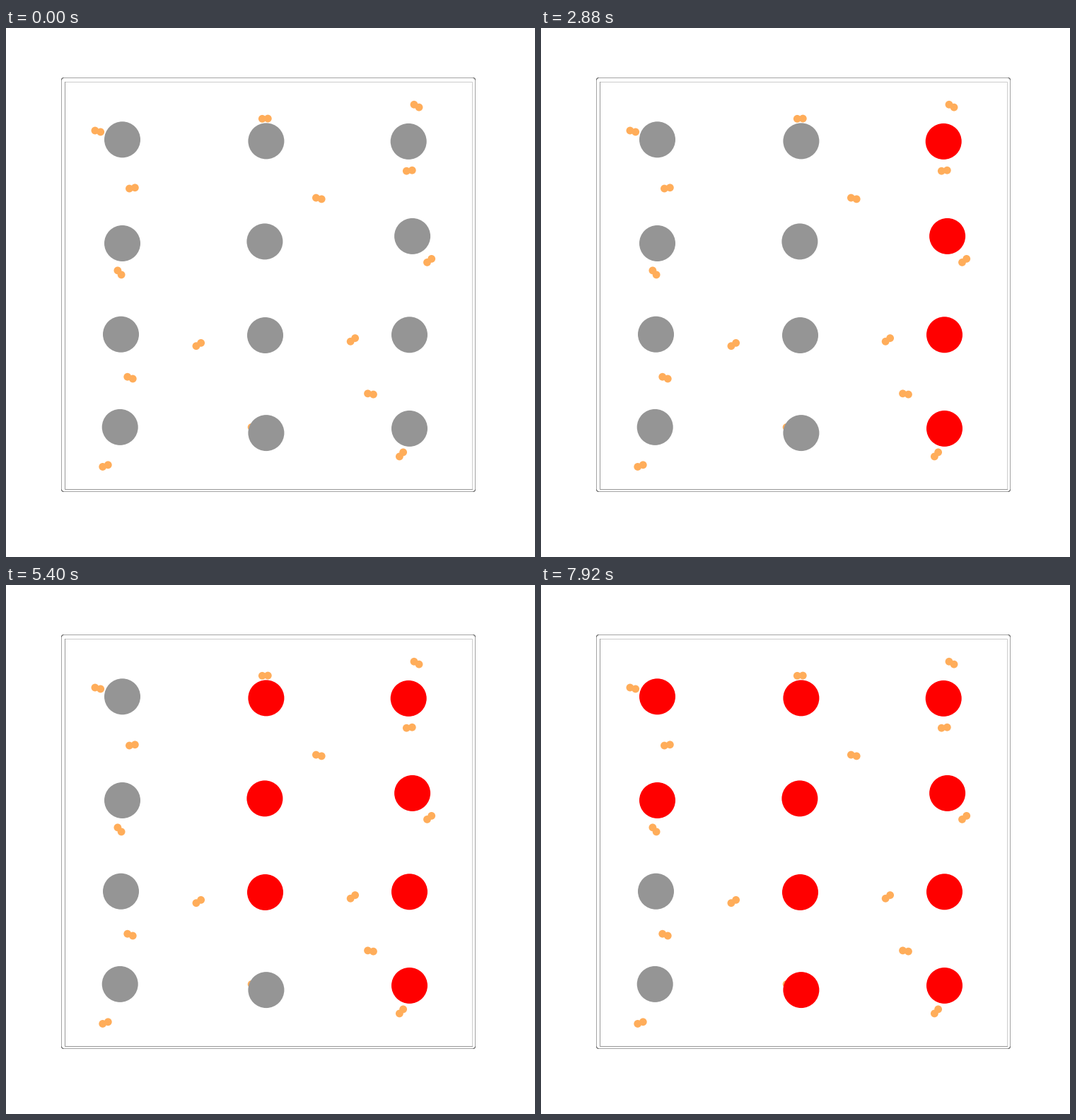
Write a matplotlib script that moves like this. It is 748x748 px and loops after 8 s.

```python
from math import cos, radians, sin

import matplotlib.pyplot as plt
from matplotlib.animation import FuncAnimation
from matplotlib.patches import Arc, Circle, FancyBboxPatch

SIZE, DPI = 748, 64
PX = 72 / DPI                      # one pixel in points
STEP, LOOP = 40, 8000              # ms
FIRST, GAP = 360, 840              # ms until the first disc turns, then between discs
GRAY, RED, ORANGE = "#959595", "#ff0000", "#ffad5a"
DISC_R, DOT_R, SPREAD = 25.5, 5.4, 8

# Disc centres in the order in which they turn red: column by column from the right
DISCS = [
    (569.2, 160.4), (574.6, 294.4), (570.5, 433.8), (570.5, 566.4),
    (367.9, 159.9), (365.9, 301.9), (366.5, 434.5), (367.9, 572.6),
    (164.5, 157.8), (164.5, 304.5), (162.5, 433.2), (161.2, 564.4),
]
# Centre and tilt in degrees of each pair of dots
PAIRS = [
    (129.8, 146, 14), (178.4, 226.4, -9), (160.5, 345.9, 49),
    (272.3, 447.5, -33), (175.5, 494.6, 20), (140.5, 619.1, -19),
    (366.3, 128.2, -2), (350.6, 566.5, 30), (442.3, 241, 13),
    (490.4, 440.9, -36), (515.5, 517.5, 9), (559, 602.9, -49),
    (598.6, 328.9, -39), (570.3, 201.7, -7), (580.5, 110.2, 29),
]

fig = plt.figure(figsize=(SIZE / DPI, SIZE / DPI), dpi=DPI, facecolor="white")
ax = fig.add_axes([0, 0, 1, 1])
ax.set_xlim(0, SIZE)
ax.set_ylim(SIZE, 0)
ax.axis("off")


def dot(x, y, r, color, z):
    return ax.add_patch(Circle((x, y), r, fc=color, ec="none", zorder=z))


def pair(x, y, tilt):
    dx, dy = SPREAD / 2 * cos(radians(tilt)), SPREAD / 2 * sin(radians(tilt))
    for side in (-1, 1):
        dot(x + side * dx, y + side * dy, DOT_R, ORANGE, 2)


def outer_border(x, y, side, r):
    ax.add_patch(FancyBboxPatch(
        (x, y), side, side, boxstyle=f"round,pad=0,rounding_size={r}",
        fc="none", ec="#a4a4a4", lw=PX, zorder=1))
    near, far = r, side - r
    corners = [(far, far), (near, far), (near, near), (far, near)]
    for k, (cx, cy) in enumerate(corners):
        ax.add_patch(Arc((x + cx, y + cy), 2 * r, 2 * r, theta1=90 * k,
                         theta2=90 * k + 90, ec="#606060", lw=PX, zorder=1))


def inner_border(x, y, side):
    x2, y2 = x + side, y + side
    for path, color in (([x, x2, x2], [y, y, y2]), "#cccccc"), (([x, x, x2], [y, y2, y2]), "#989898"):
        ax.plot(*path, color=color, lw=PX, solid_joinstyle="miter", zorder=1)


outer_border(78.5, 70.5, 585, 3)
inner_border(83.5, 75.5, 576)
for p in PAIRS:
    pair(*p)
discs = [dot(x, y, DISC_R, GRAY, 3) for x, y in DISCS]


def update(i):
    t = i * STEP
    for k, disc in enumerate(discs):
        disc.set_facecolor(RED if t >= FIRST + k * GAP else GRAY)
    return discs


anim = FuncAnimation(fig, update, frames=LOOP // STEP, interval=STEP,
                     repeat=True, repeat_delay=0, blit=False)
plt.show()
```
